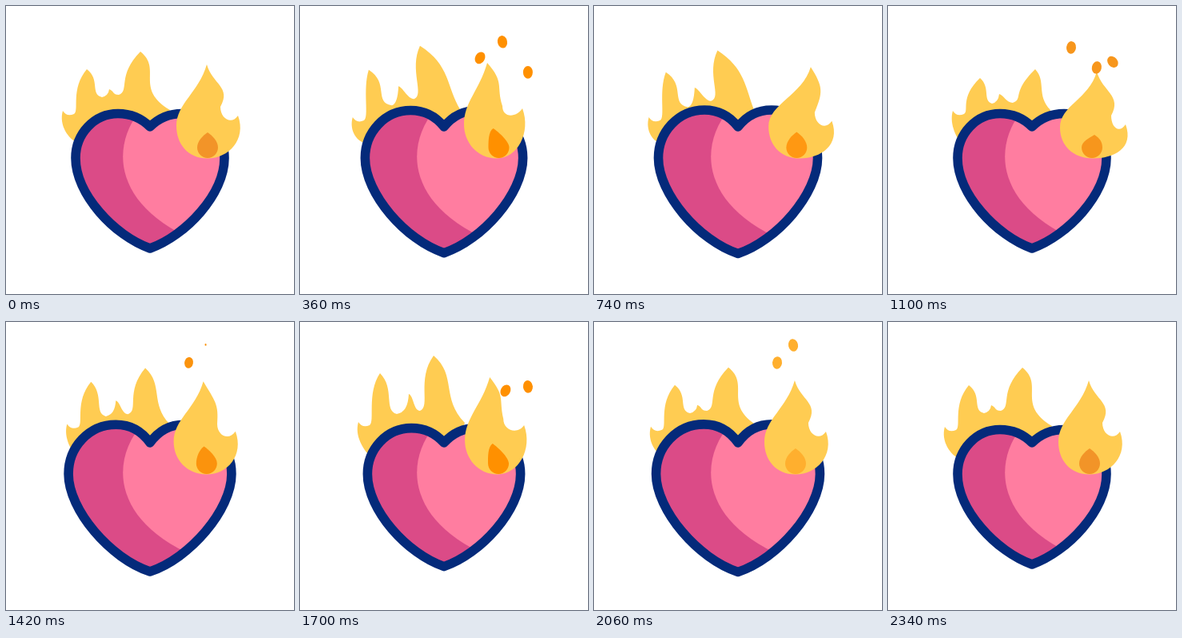
Recreate the animation shown at these times as an HTML page with a canvas. Size 360x360 px, loop 2.4 s.

```html
<!DOCTYPE html>
<html lang="en">
<head>
<meta charset="utf-8">
<title>Burning heart</title>
<style>
  html, body { margin: 0; width: 100%; height: 100%; overflow: hidden; background: #fff; }
  canvas { display: block; width: 360px; height: 360px; }
</style>
</head>
<body>
<canvas id="stage"></canvas>
<script>
const LOOP = 2400;
const NAVY = '#042a7a', ROSE = '#db4b87', PINK = '#ff7da0', YELLOW = '#ffcc52';

const canvas = document.getElementById('stage');
const ratio = window.devicePixelRatio || 1;
canvas.width = canvas.height = 360 * ratio;
const ctx = canvas.getContext('2d');
ctx.scale(ratio, ratio);

const smooth = p => (1 - Math.cos(Math.PI * p)) / 2;
const linear = p => p;

// Track: rows of [time, value, value, ...]
function sample(track, t, ease = smooth) {
  const last = track[track.length - 1];
  if (t >= last[0]) return last.slice(1);
  if (t <= track[0][0]) return track[0].slice(1);
  const i = track.findIndex(row => row[0] > t);
  const a = track[i - 1], b = track[i];
  const p = ease((t - a[0]) / (b[0] - a[0]));
  return a.slice(1).map((v, k) => v + (b[k + 1] - v) * p);
}

const beat = [[0, 0], [200, 12], [510, 0], [600, 0], [860, 11.5], [1090, 0], [1130, 0],
  [1400, 9], [1680, 2.5], [1960, 12], [2290, 0]];

// spike, left tip, valley, small peak, valley, tall tip, right end, sway
const backRest = [71, 131, 101, 79, 120, 114, 129, 104, 141, 111, 168, 57, 205, 130, 45];
const back = [
  [0, ...backRest],
  [550, 64, 142, 80.5, 80, 113, 128, 121, 99, 143, 118, 143.5, 47, 199, 130, 8],
  [1100, 81, 131, 115, 90, 130, 122, 139, 110, 156, 121, 184, 79, 203, 130, 18],
  [1680, 73, 125, 100, 64, 121, 115, 136, 90, 150, 111, 167, 42, 206, 126, 30],
  [2100, ...backRest]
];

// tip, left side, valley, spike, two bends, base x, drop tip, drop x
const frontRest = [251, 73, 213, 150, 268, 126, 290, 137, 7, 14, 252, 252, 158, 252];
const front = [
  [0, ...frontRest],
  [370, 234, 71, 205, 148, 253, 125, 278, 128, 22, -8, 246, 241.5, 153, 248.5],
  [850, 276, 77, 220, 151, 279, 134, 300, 146, 15, 13, 259, 255, 158, 254],
  [1100, 261, 82, 215, 152, 279, 137, 297, 148, 7, 14, 256, 258, 161, 255],
  [1670, 237, 69, 206, 148, 254, 121, 280, 129, 20, -6, 247, 240.5, 152, 248],
  [2080, ...frontRest]
];

const orange = [[0, 242, 148, 40], [360, 255, 144, 0], [740, 255, 152, 18], [1100, 247, 150, 28],
  [1700, 255, 144, 0], [2060, 255, 175, 46], [2340, 242, 148, 40]];

// Each spark: rows of [time, x, y, tilt]
const sparks = [
  [[60, 285, 88, 0], [360, 253, 45, -.2], [480, 249, 28, -.1], [600, 248, 25, 0]],
  [[120, 256, 92, .4], [360, 225, 65, .5], [560, 230, 42, 0]],
  [[280, 287, 92, 0], [360, 285, 83, 0], [640, 256, 46, -.4]],
  [[860, 257, 86, .3], [1100, 229, 52, .1], [1280, 231, 34, 0]],
  [[960, 287, 90, 0], [1100, 281, 70, -.7], [1300, 253, 44, -.2], [1440, 249, 26, 0]],
  [[1000, 257, 88, .3], [1100, 261, 77, .2], [1320, 227, 62, .4], [1520, 230, 40, 0]],
  [[1620, 258, 95, .3], [1700, 257, 86, .5], [2060, 229, 51, .1], [2210, 230, 40, 0]],
  [[1600, 287, 92, 0], [1700, 285, 81, -.1], [2060, 249, 29, -.2], [2220, 248, 26, 0]]
];

function drawBack(t) {
  const [sx, sy, lx, ly, vx, vy, px, py, wx, wy, tx, ty, ex, ey, sway] = sample(back, t);
  const nx = sx + 14, ny = sy + 4;
  const dx = vx - lx, dy = vy - ly, rx = ex - tx, ry = ey - ty;
  const p = new Path2D();
  p.moveTo(92, 172);
  p.bezierCurveTo(sx + 6, sy + 36, sx - 5, sy + 17, sx, sy);
  p.quadraticCurveTo(sx + 5, sy + 8, nx, ny);
  p.bezierCurveTo(nx + 7, ny - 4, lx - 1.3 * (lx - nx), ly + 25, lx, ly);
  p.bezierCurveTo(lx + .9 * dx, ly + .37 * dy, vx - .8 * dx, vy - 4, vx, vy);
  p.quadraticCurveTo(px - 1, vy - 2, px, py);
  p.bezierCurveTo(px + 6, py + 2, wx - 8, wy, wx, wy);
  p.bezierCurveTo(wx + 14, wy - 5, tx - 8 - .8 * (tx - wx), ty + 30, tx, ty);
  p.bezierCurveTo(tx + .75 * rx, ty + .3 * ry, ex - sway, ey - .37 * ry, ex, ey);
  p.lineTo(190, 170);
  p.closePath();
  ctx.fillStyle = YELLOW;
  ctx.fill(p);
}

function drawHeart(t) {
  const [h] = sample(beat, t);
  const p = new Path2D();
  const w = 93 + h, top = 134.5 - .7 * h, tip = 303 + h;
  const crown = 40 + .3 * h;
  p.moveTo(180, 151);
  p.bezierCurveTo(169, 140 - .5 * h, 155, top, 180 - crown, top);
  p.bezierCurveTo(110 - .7 * h, top, 180 - w, 160 - .4 * h, 180 - w, 190);
  p.bezierCurveTo(180 - w, 235, 135 - .5 * h, 287 + h, 180, tip);
  p.bezierCurveTo(225 + .5 * h, 287 + h, 180 + w, 235, 180 + w, 190);
  p.bezierCurveTo(180 + w, 160 - .4 * h, 250 + .7 * h, top, 180 + crown, top);
  p.bezierCurveTo(205, top, 191, 140 - .5 * h, 180, 151);
  p.closePath();

  ctx.fillStyle = ROSE;
  ctx.fill(p);
  ctx.save();
  ctx.clip(p);
  ctx.beginPath();
  ctx.moveTo(173, 125);
  ctx.bezierCurveTo(134, 165, 127, 240, 225, 288);
  ctx.lineTo(310, 288);
  ctx.lineTo(310, 110);
  ctx.closePath();
  ctx.fillStyle = PINK;
  ctx.fill();
  ctx.restore();
  ctx.strokeStyle = NAVY;
  ctx.lineWidth = 11.6;
  ctx.lineJoin = 'round';
  ctx.stroke(p);
}

function drawFront(t, glow) {
  const [tx, ty, lx, ly, vx, vy, sx, sy, b1, b2, base, dx, dy, cx] = sample(front, t);
  const p = new Path2D();
  p.moveTo(base, 190.5);
  p.bezierCurveTo(base - 25, 190.5, lx, ly + 22, lx, ly);
  p.bezierCurveTo(lx, ly - 28, tx - 10, ty + 35, tx, ty);
  p.bezierCurveTo(tx + b1, ty + 25, vx + b2, vy - 25, vx, vy);
  p.bezierCurveTo(vx, vy + 15, sx - 8, sy + 12, sx, sy);
  p.bezierCurveTo(sx + 11, sy + 30, base + 26, 190.5, base, 190.5);
  ctx.fillStyle = YELLOW;
  ctx.fill(p);

  const d = new Path2D();
  d.moveTo(dx, dy);
  d.bezierCurveTo(dx + 6, dy + 4, cx + 13, 169, cx + 13, 177);
  d.bezierCurveTo(cx + 13, 184, cx + 7, 190, cx, 190);
  d.bezierCurveTo(cx - 7, 190, cx - 13, 184, cx - 13, 177);
  d.bezierCurveTo(cx - 13, 169, dx - 6, dy + 4, dx, dy);
  ctx.fillStyle = glow;
  ctx.fill(d);
}

function drawSparks(t, glow) {
  ctx.fillStyle = glow;
  for (const track of sparks) {
    const start = track[0][0], end = track[track.length - 1][0];
    if (t <= start || t >= end) continue;
    const [x, y, tilt] = sample(track, t, linear);
    const size = Math.min(1, (t - start) / 70, (end - t) / 110);
    ctx.beginPath();
    ctx.ellipse(x, y, 6 * size, 7.8 * size, tilt, 0, 2 * Math.PI);
    ctx.fill();
  }
}

function draw() {
  const t = performance.now() % LOOP;
  const glow = `rgb(${sample(orange, t, linear).map(Math.round).join(',')})`;
  ctx.fillStyle = '#fff';
  ctx.fillRect(0, 0, 360, 360);
  drawBack(t);
  drawHeart(t);
  drawFront(t, glow);
  drawSparks(t, glow);
  requestAnimationFrame(draw);
}
draw();
</script>
</body>
</html>
```
